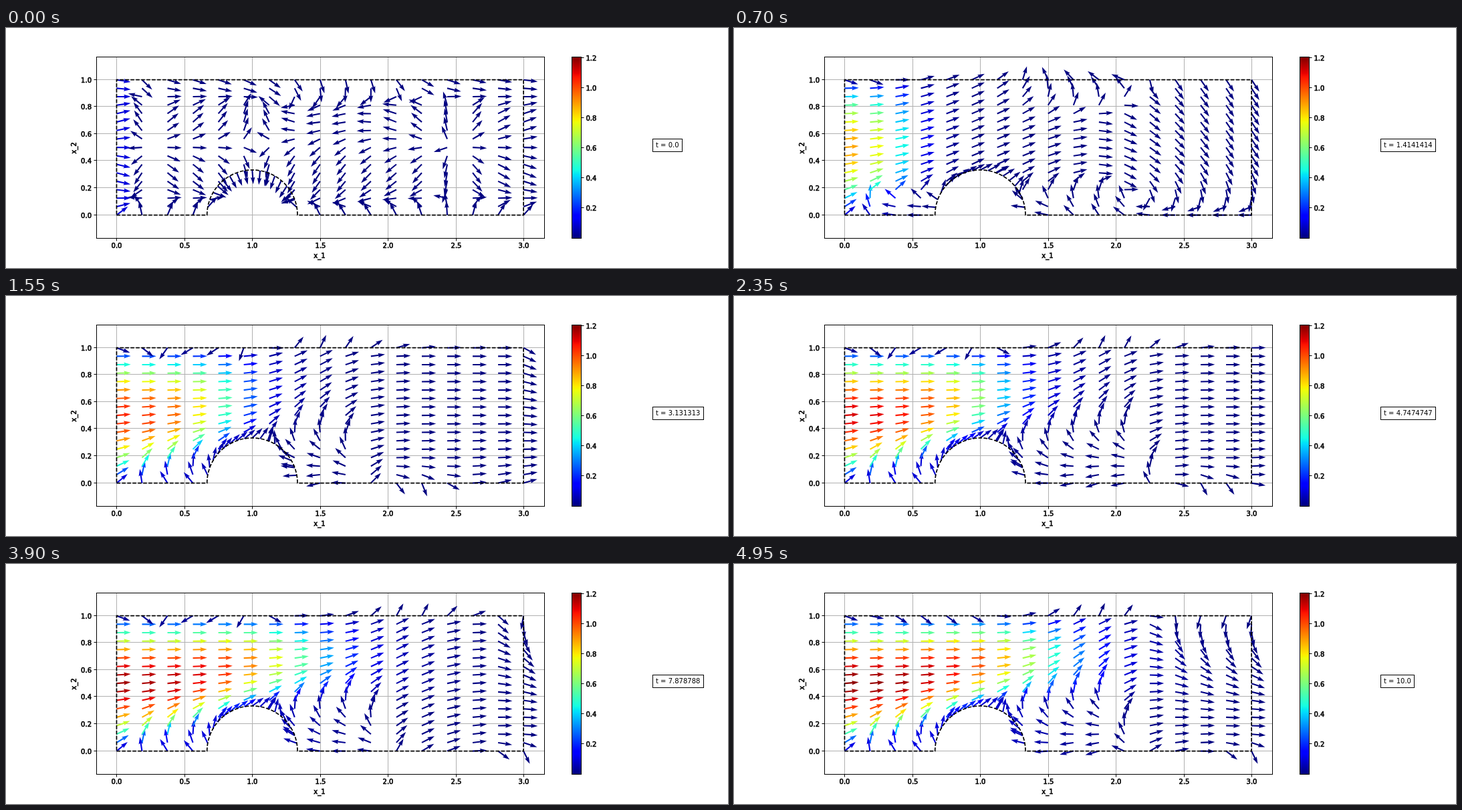
An HTML page that plays this animation: 1080x360 px, repeating every 5000 ms.

```html
<!DOCTYPE html>
<html lang="en">
<head>
<meta charset="utf-8">
<title>Channel flow</title>
<style>
html, body { margin: 0; width: 100%; height: 100%; overflow: hidden; background: #fff; }
svg { display: block; width: 1080px; height: 360px; }
text { font: 10px "DejaVu Sans", Verdana, sans-serif; }
.label { stroke: #000; stroke-width: .6px; }
.grid { stroke: #b0b0b0; stroke-width: 1; }
.frame { fill: none; stroke: #000; stroke-width: 1; }
.wall { fill: none; stroke: #000; stroke-width: 1.7; stroke-dasharray: 5.55 2.4; }
.bar { shape-rendering: crispEdges; }
</style>
</head>
<body>
<svg id="stage" viewBox="0 0 1080 360"></svg>
<script>
const STEPS = 100, STEP_MS = 50, END_TIME = 10;
const SCALE = 202.9, VMAX = 1.208;
const ONSET_TIME = 1.41, FLOW_TIME = 3.13;
const px = x => 165.44 + x * SCALE;
const py = y => 280.6 - y * SCALE;
const snapX = v => Math.round(v) + .5;
const snapY = v => Math.round(v) - .5;
const clamp = v => Math.min(1, Math.max(0, v));
const smooth = v => { const u = clamp(v); return u * u * (3 - 2 * u); };
const bump = (v, centre, width) => Math.exp(-(((v - centre) / width) ** 2));
const lerp = (a, b, k) => a + (b - a) * k;
const stage = document.getElementById('stage');

function add(tag, attrs, text) {
  const el = document.createElementNS('http://www.w3.org/2000/svg', tag);
  for (const key in attrs) el.setAttribute(key, attrs[key]);
  if (text) el.textContent = text;
  stage.append(el);
  return el;
}
const line = (x1, y1, x2, y2, cls) => add('line', { x1, y1, x2, y2, class: cls });
const label = (x, y, text, anchor, more) =>
  add('text', { x, y, class: 'label', 'text-anchor': anchor, ...more }, text);

// Colour map: stops of [position, level] for each channel
const JET = [
  [[0, 0], [.35, 0], [.66, 1], [.89, 1], [1, .5]],
  [[0, 0], [.125, 0], [.375, 1], [.64, 1], [.91, 0], [1, 0]],
  [[0, .5], [.11, 1], [.34, 1], [.65, 0], [1, 0]]
];
function jet(v) {
  const u = clamp(v);
  return 'rgb(' + JET.map(stops => {
    const i = Math.max(1, stops.findIndex(s => s[0] >= u));
    const [a, b] = [stops[i - 1], stops[i]];
    return Math.round(255 * lerp(a[1], b[1], (u - a[0]) / (b[0] - a[0])));
  }).join() + ')';
}

const unit = ([u, v]) => { const n = Math.hypot(u, v) || 1; return [u / n, v / n]; };
const blend = (a, b, k) => unit([lerp(a[0], b[0], k), lerp(a[1], b[1], k)]);

// Fluid at rest: weak cells alternating along and across the channel
function restFlow(x, y) {
  const u = .4 * Math.cos(2 * Math.PI * (x - .3) / 2.9)
    + Math.exp(-x / .05) - .65 * bump(x, .2, .07)
    + .5 * smooth((y - .8) / .2);
  const v = -.34 * (1 - .2 * x) * Math.sin(2 * Math.PI * (y - .13) / .75)
    - .3 * bump(x, 1.6, .4) * smooth(y / .25);
  return unit([u * Math.min(1, .3 + 4 * y), v]);
}

// Inflow starts: one large clockwise roll fills the channel
function rollFlow(x, y) {
  const edge = ((y - .5) / .35) ** 2;
  const u = 1 - edge * (y > .5 ? bump(x, 1.8, .5) : 1);
  const fall = (.4 - 1.9 * smooth((x - 1.3) / 1.7)) * Math.min(1, x / .8) * smooth(y / .25);
  const topLift = .9 * bump(x, 1.8, .45) * smooth((y - .7) / .2);
  const floorLift = 1.6 * bump(x, 1.85, .25) * (1 - smooth(y / .35));
  return unit([u, fall + topLift + floorLift]);
}

// Steady stream that turns back near the floor, with a moving wake and outlet
function streamFlow(x, y, t) {
  const wakeEnd = 1.6 + .07 * (t - 6) + .6 * bump(t, 4.3, 1.1);
  const swell = 2.1 - .04 * (t - 7.2) ** 2;
  const outlet = 3.3 - .25 * Math.abs(t - 5);
  const sink = Math.min(3, 2.2 + .31 * (t - FLOW_TIME));
  const inlet = Math.exp(-x / .1);

  const turnHeight = .06 + .1 * x + .11 * smooth((x - .95) / .35)
    - .34 * inlet - .75 * smooth((x - wakeEnd) / .5);
  let deg = 180 / (1 + Math.exp((y - turnHeight) / (.12 + .1 * inlet)));
  deg += 26 * bump(x, swell, .4);
  deg -= 110 * y ** 2.5 * smooth((x - outlet) / .5);
  deg -= 80 * bump(x, sink, .28) * Math.exp(-y / .06);

  // Slip along the top wall
  const slip = 150 * Math.exp(-(((x - .65) / .42) ** 4)) * (1 - .75 * smooth((t - 8) / 2));
  deg += smooth((y - .94) / .06) * (40 * bump(x, swell + .15, .45) - 20 * inlet - slip);
  const a = deg * Math.PI / 180;
  return [Math.cos(a), Math.sin(a)];
}

function direction(x, y, t) {
  const stream = streamFlow(x, y, t);
  if (t >= FLOW_TIME) return stream;
  const onset = blend(stream, rollFlow(x, y), smooth(x / .5));
  return t < ONSET_TIME
    ? blend(restFlow(x, y), onset, t / ONSET_TIME)
    : blend(onset, stream, (t - ONSET_TIME) / (FLOW_TIME - ONSET_TIME));
}

function speed(x, y, t) {
  const r = 1 - Math.exp(-t / 4.5);
  const front = 1 / (1 + Math.exp((x - 1.62 * r + .06) / (.02 + .29 * r)));
  const peak = 1.28 * (t + .08) / (t + .75);
  const base = .33 * clamp((x - .3) / .7);
  const s = clamp((y - base) / (1 - base));
  const floor = y > .99 ? .02 : .09;
  return peak * front * Math.max(4 * s * (1 - s), floor) + .09 * Math.exp(-x / .04 - t);
}

function floatText(value) {
  const f = Math.fround(value);
  let digits = 1;
  while (Math.fround(+f.toPrecision(digits)) !== f) digits++;
  const n = +f.toPrecision(digits);
  return Number.isInteger(n) ? n + '.0' : String(n);
}

// Plot background
for (let i = 0; i <= 6; i++) {
  const x = snapX(px(i / 2));
  line(x, 43.5, x, 315.5, 'grid');
  line(x, 315.5, x, 319.5, 'frame');
  label(x, 330, (i / 2).toFixed(1), 'middle');
}
for (let i = 0; i <= 5; i++) {
  const y = snapY(py(i / 5));
  line(135.5, y, 805.5, y, 'grid');
  line(131.5, y, 135.5, y, 'frame');
  label(128, y + 4, (i / 5).toFixed(1), 'end');
}
label(469, 345, 'x_1', 'middle');
label(0, 0, 'x_2', 'middle', { transform: 'translate(104.5 180) rotate(-90)' });

// Mesh points outside the bump, then points along its arc
const points = [];
for (let c = 0; c <= 16; c++) for (let r = 0; r <= 16; r++) {
  const x = c * 3 / 16, y = r / 16;
  if (Math.hypot(x - 1, y) > 1 / 3) points.push([x, y]);
}
for (let deg = 10; deg < 180; deg += 10) {
  const a = deg * Math.PI / 180;
  points.push([1 + Math.cos(a) / 3, Math.sin(a) / 3]);
}
const arrows = points.map(([x, y]) => ({
  x, y, el: add('path', { d: 'M0-1.05H11.9L10.8-3.3L21.3 0L10.8 3.3L11.9 1.05H0Z' })
}));

const rad = SCALE / 3;
add('path', {
  class: 'wall',
  d: `M${px(0)} ${py(0)}H${px(2 / 3)}A${rad} ${rad} 0 0 1 ${px(4 / 3)} ${py(0)}` +
     `H${px(3)}V${py(1)}H${px(0)}Z`
});
add('rect', { x: 135.5, y: 43.5, width: 670, height: 272, class: 'frame' });

// Colour bar
for (let y = 0; y < 272; y++) {
  add('rect', { x: 847, y: 43 + y, width: 13, height: 1, class: 'bar', fill: jet(1 - y / 271) });
}
add('rect', { x: 846.5, y: 43.5, width: 14, height: 272, class: 'frame' });
for (let i = 1; i <= 6; i++) {
  const y = snapY(315.5 - i * 45.04);
  line(860.5, y, 864.5, y, 'frame');
  label(867.5, y + 4, (i / 5).toFixed(1), 'start');
}

const box = add('rect', { x: 967.5, y: 166.5, height: 19, class: 'frame' });
const clock = add('text', { x: 972, y: 179 });

function draw(step) {
  const t = step * END_TIME / (STEPS - 1);
  for (const { x, y, el } of arrows) {
    const [u, v] = direction(x, y, t);
    el.setAttribute('transform', `matrix(${u} ${-v} ${v} ${u} ${px(x)} ${py(y)})`);
    el.setAttribute('fill', jet(speed(x, y, t) / VMAX));
  }
  clock.textContent = 't = ' + floatText(t);
  box.setAttribute('width', Math.round(clock.getComputedTextLength() + 9.3));
}

let shown = -1;
function tick() {
  const step = Math.floor(performance.now() / STEP_MS) % STEPS;
  if (step !== shown) draw(shown = step);
  requestAnimationFrame(tick);
}
tick();
</script>
</body>
</html>
```
